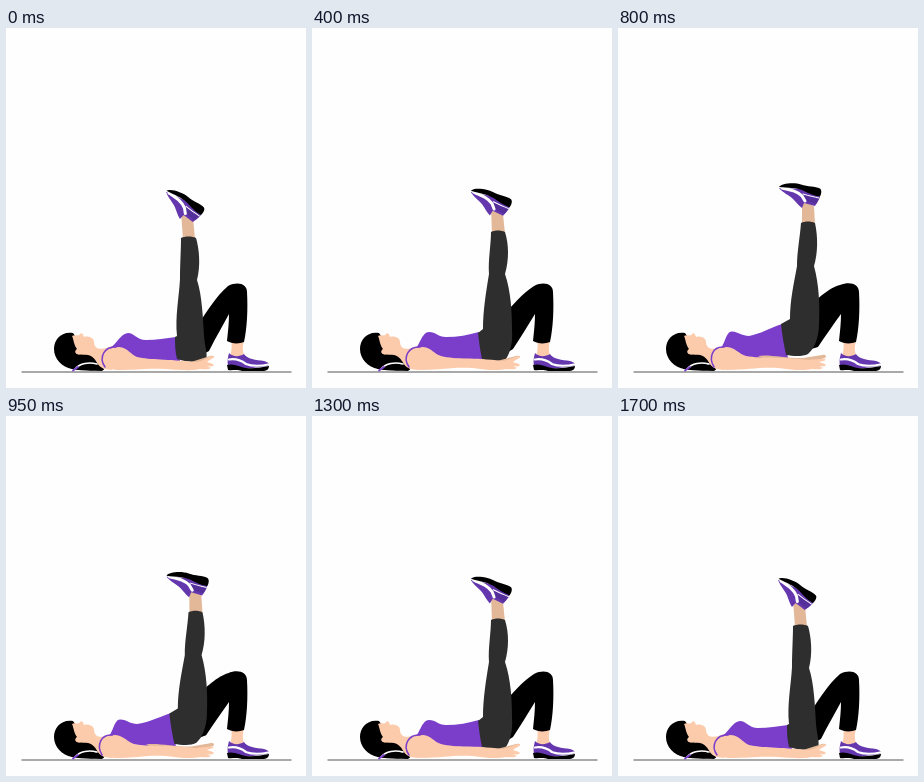
An HTML page for the animation above (1750 ms loop, 300 by 360 pixels).

```html
<!DOCTYPE html>
<html lang="en">
<head>
<meta charset="utf-8">
<title>Single-leg bridge</title>
<style>
  html, body { margin: 0; width: 100%; height: 100%; overflow: hidden; background: #fefefe; }
  svg { display: block; width: 300px; height: 360px; }
  .skin { fill: #fccbac; }
  .shade { fill: #e3b898; }
  .shirt { fill: #7b3ecb; }
  .shoe { fill: #6537ae; }
  .heel { fill: #55309a; }
  .pants { fill: #2e2e2e; }
  .line { fill: none; stroke-linecap: round; }
  .white { stroke: #fff; }
  .purple { stroke: #7b3ecb; }
</style>
</head>
<body>
<svg viewBox="0 0 300 360">
  <path d="M15.500 344H285.500" stroke="#8c8c8c" stroke-width="1.4"/>

  <!-- planted leg -->
  <path class="skin" d="M225 311L238 311C237 317 236 322 238 327C234 331 228 331 224 328C226 322 226 317 225 311Z"/>
  <path class="shoe" d="M223 325C227 329 233 329 238 326C241 331 250 332 258 333C262 334 264 336 262 338L238 341L222 338C221 333 222 329 223 325Z"/>
  <path class="line white" stroke-width="2.200" d="M223 331.500C231 330 236 333 240 336C246 338.500 256 338 262 336.500"/>
  <path d="M221 337C228 335 234 339 240 340C248 341 256 339 263 338C263 341 261 343 256 343L236 343C230 341 226 343 222 342Z"/>
  <path id="farLeg"/>

  <!-- head -->
  <path d="M67 305C55 303 48 312 48 321C48 331 56 339 66 341C75 343 90 343 98 342L92 330L72 312Z"/>
  <path class="skin" d="M66 308C69 306 72 309 74 306C76 304 77 306 78 309C82 308 85 309 87 311C89 314 87 317 91 320C96 322 101 320 106 318L106 342L98 341C89 337 92 330 82 327C76 326 72 328 69 325C66 320 67 314 66 308Z"/>
  <path d="M66 308C68 313 68 317 71 321C68 323 69 326 73 327C80 326 87 330 88 336L98 341L96 343L66 341L54 330Z"/>
  <path class="line white" stroke-width="1.600" d="M69 341C74 335 83 334 91 336"/>
  <path class="line purple" stroke-width="1.800" d="M67 342.500L72 339"/>

  <path id="torso" class="shirt"/>
  <path id="ankle" class="shade"/>
  <path id="leg" class="pants"/>
  <path id="farArm" class="shade"/>
  <path id="arm" class="skin"/>
  <path id="armhole" class="line purple" stroke-width="1.500"/>

  <g id="foot">
    <path class="shoe" d="M-29 -16C-25 -11 -19 -9 -15 -5C-12 -2 -10 1 -6 4L-4 -1L7 2C9 -1 12 -5 12 -10L-5 -15Z"/>
    <path class="heel" d="M-5 -9C1 -8 7 -7 12 -7L8 0L-2 -3Z"/>
    <path class="line white" stroke-width="3" d="M-26 -16C-17 -14 -11 -13 -6 -8L-3 -3"/>
    <path class="line white" stroke-width="1" d="M-5 -10C1 -8 7 -7 11 -6"/>
    <path d="M-29 -17C-27 -21 -13 -22 -7 -19.500C0 -17 7 -18 12 -15.500C14 -14 13.500 -10 12 -7.500C6 -8 0 -11 -5 -13.500C-12 -16.500 -20 -16 -29 -17Z"/>
  </g>
</svg>
<script>
  const STEP = 50, FRAMES = 35, TOP = 17;
  const shin = 'C232 253 241 256 241 264C242 282 241 300 238 314C233 316 226 316 221 313C222 303 223 295 223 286';

  // Each shape has a resting, a middle and a raised pose.
  const poses = {
    farLeg: [
      `M190 300C198 288 210 268 222 258${shin}C217 297 210 309 203 323L190 330Z`,
      `M192 288C198 279 212 264 222 258${shin}C216 297 209 309 201 321L190 328Z`,
      `M192 278C198 272 212 259 222 257${shin}C215 297 208 307 200 319L190 322Z`
    ],
    torso: [
      'M104 320C110 317 114 306 122 305C128 305 131 312 140 312C150 312 160 310 170 309L174 333L112 336Z',
      'M103 321C108 317 110 304 117 304C124 304 126 309 134 309C146 309 156 307 167 304L171 333L110 336Z',
      'M102 321C107 317 108 303 114 303.5C121 304 124 308 131 308C142 306 152 300 164 296L170 330L110 336Z'
    ],
    ankle: [
      'M175 184L187 190L189 211L177 211Z',
      'M179 180L191 186L193 206L180 206Z',
      'M184 173L196 178L197 197L184 197Z'
    ],
    leg: [
      'M175 210C179 208 186 208 190 210C193 220 195 237 191 252C196 267 197 290 198 308C199 320 202 326 200 333C190 335 180 334 171 331C169 323 169 316 169 309L171 308C169 288 173 270 174 251C174 237 175 222 175 210Z',
      'M179 204C183 202 189 202 193 204C197 217 197 232 193 246C199 264 200 284 200 302C201 315 198 325 194 331C188 335 177 334 170 331C168 322 167 313 166 305L171 301C171 283 174 264 177 246C176 232 179 217 179 204Z',
      'M183 195C187 193 193 193 197 195C200 209 200 225 196 238C201 256 202 278 201 296C201 310 196 321 190 326C184 329 175 328 168 327C166 317 164 307 163 296L172 291C172 272 176 255 179 238C179 224 182 209 183 195Z'
    ],
    farArm: [
      'M140 333C155 333 170 334 185 334L204 328C208 327 209 329 207 330L196 335L150 336Z',
      'M140 331C155 330 170 333 185 333L204 328C208 327 209 329 207 330L196 335L150 335Z',
      'M140 328C150 326 165 330 185 330L204 327C208 326 209 329 207 330L196 333L150 333Z'
    ],
    arm: [
      'M98 331C98 322 106 319 113 319C122 320 124 326 131 329C145 332 160 331 190 334C198 333 203 328 207 328C209 330 203 332 201 334L207 336C209 338 206 339 201 338L205 340C202 342 198 341 194 341C185 343 175 342 160 341C140 340 130 342 112 342C103 342 98 338 98 331Z',
      'M96 331C96 322 104 319 111 319C120 320 122 326 129 328C145 332 160 329 190 333C198 332 203 328 207 328C209 330 203 332 201 334L207 336C209 338 206 339 201 338L205 340C202 342 198 341 194 341C185 343 175 342 160 340C140 339 130 342 110 342C101 342 96 338 96 331Z',
      'M95 331C95 322 102 319 109 319C118 320 121 326 128 328C145 331 160 328 190 332C198 331 203 331 207 331C209 333 203 333 201 334L207 336C209 338 206 339 201 338L205 340C202 342 198 341 194 341C185 343 175 342 160 340C140 339 130 342 109 342C100 342 95 338 95 331Z'
    ],
    armhole: [
      'M110 319C99 318 92 329 99 339',
      'M108 319C97 318 90 329 97 339',
      'M106 319C95 318 90 329 96 339'
    ],
    foot: [
      'translate(181 189.5) rotate(22)',
      'translate(184.5 184.5) rotate(10)',
      'translate(190 176) rotate(0)'
    ]
  };

  const number = /-?\d+(?:\.\d+)?/g;
  const parts = Object.entries(poses).map(([id, shapes]) => ({
    node: document.getElementById(id),
    attr: id === 'foot' ? 'transform' : 'd',
    template: shapes[0],
    values: shapes.map(shape => shape.match(number).map(Number))
  }));

  // Quadratic curve through the three poses at s = 0, 1 and 2.
  const blend = (a, b, c, s) => a + (b - a) * s + (c - 2 * b + a) * s * (s - 1) / 2;

  function draw(now) {
    const step = Math.floor(now / STEP) % FRAMES;
    const s = (TOP - Math.abs(step - TOP)) / 8;
    for (const { node, attr, template, values: [a, b, c] } of parts) {
      let i = 0;
      node.setAttribute(attr, template.replace(number, () => {
        const value = blend(a[i], b[i], c[i], s).toFixed(2);
        i++;
        return value;
      }));
    }
  }

  let start;
  function tick(now) {
    start ??= now;
    draw(now - start);
    requestAnimationFrame(tick);
  }
  draw(0);
  requestAnimationFrame(tick);
</script>
</body>
</html>
```
